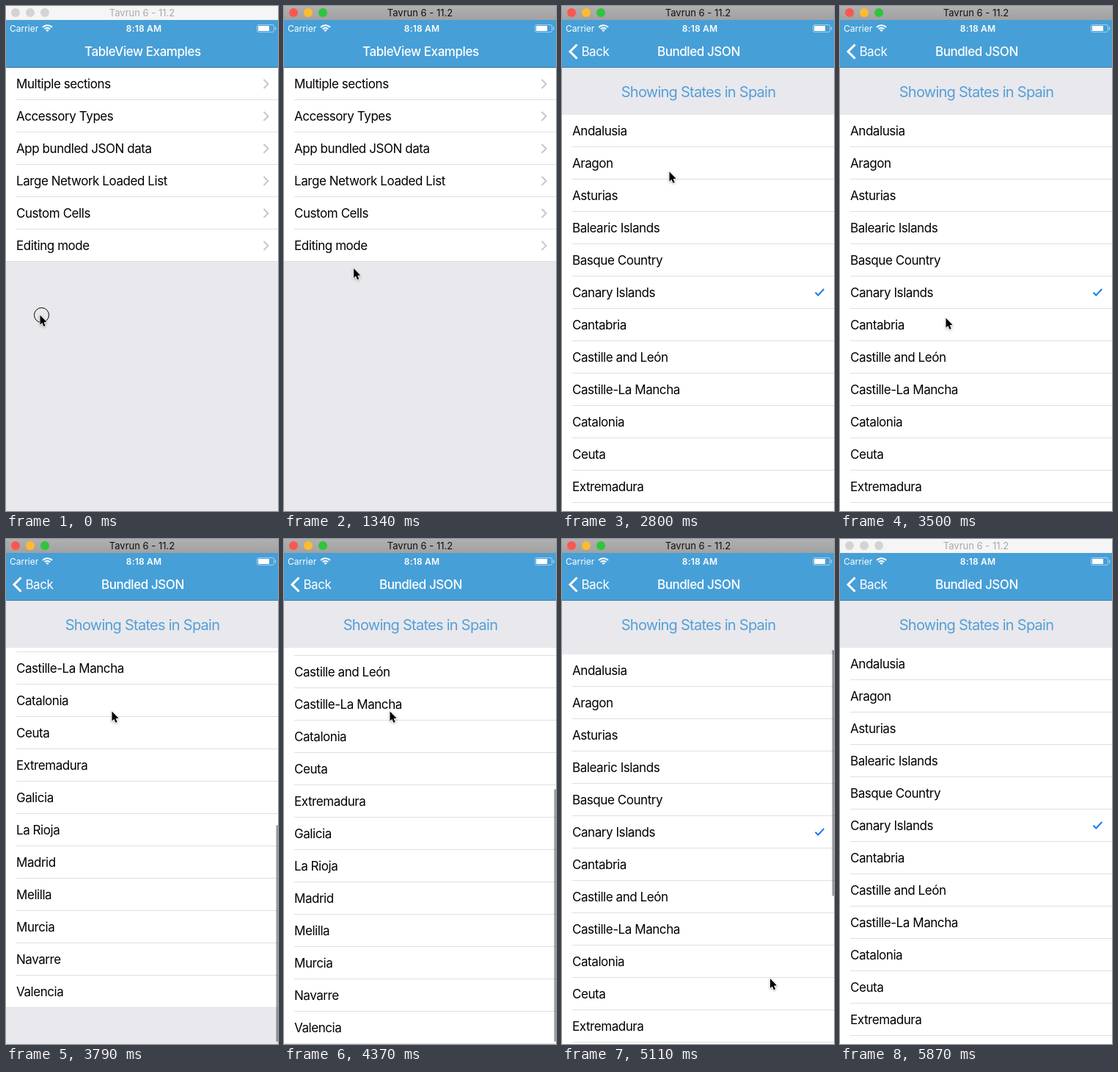
An HTML page with a canvas for the animation above (6.64 s loop, 371x687 px).

```html
<!DOCTYPE html>
<html lang="en">
<head>
<meta charset="utf-8">
<title>Table view demo</title>
<style>
  html, body { margin: 0; width: 100%; height: 100%; overflow: hidden; background: #e8e8ed; }
  canvas { display: block; width: 371px; height: 687px; }
</style>
</head>
<body>
<canvas id="stage" width="371" height="687"></canvas>
<script>
const ctx = document.getElementById('stage').getContext('2d');
const LOOP = 6640, W = 375, H = 687, ROW = 44, LIST_TOP = 148;
const BLUE = '#479fd7', BACKDROP = '#e8e8ed', LINE = '#dfdfe2';

const MENU = ['Multiple sections', 'Accessory Types', 'App bundled JSON data',
  'Large Network Loaded List', 'Custom Cells', 'Editing mode'];
const REGIONS = ['Andalusia', 'Aragon', 'Asturias', 'Balearic Islands', 'Basque Country',
  'Canary Islands', 'Cantabria', 'Castille and León', 'Castille-La Mancha', 'Catalonia',
  'Ceuta', 'Extremadura', 'Galicia', 'La Rioja', 'Madrid', 'Melilla', 'Murcia',
  'Navarre', 'Valencia'];
const CHECKED = 'Canary Islands';
const VIEW = H - LIST_TOP, CONTENT = REGIONS.length * ROW, MAX_SCROLL = CONTENT - VIEW;

const clamp = v => Math.min(1, Math.max(0, v));
const linear = u => u;
const smooth = u => u * u * (3 - 2 * u);
const easeOut = u => 1 - (1 - u) ** 2;

// Keys are [time, value, easing into this key].
function track(keys, t) {
  let prev = keys[0];
  for (const key of keys) {
    if (t < key[0]) {
      const u = clamp((t - prev[0]) / (key[0] - prev[0]));
      return prev[1] + (key[1] - prev[1]) * (key[2] || linear)(u);
    }
    prev = key;
  }
  return prev[1];
}

const CURSOR_X = [[0, 46], [360, 46], [530, 50, smooth], [1030, 50], [1700, 150, smooth],
  [1750, 150], [1870, 155, smooth], [2400, 155], [2800, 146, smooth], [3200, 136, smooth],
  [3500, 144, smooth], [4400, 144], [4640, 170, smooth], [4800, 182], [5110, 283, smooth], [5350, 384]];
const CURSOR_Y = [[0, 420], [360, 420], [530, 464, smooth], [1030, 464], [1700, 223, smooth],
  [1750, 223], [1870, 197, smooth], [2400, 197], [2800, 225, smooth], [3450, 424, smooth],
  [3530, 424], [3760, 234, smooth], [4400, 234], [4640, 420, smooth], [4800, 440], [5110, 597, smooth], [5350, 712]];
const SCROLL = [[3530, 0], [3640, 100, u => u * u], [3730, 300], [3790, 346, easeOut],
  [3830, 346], [4180, MAX_SCROLL, smooth], [4410, MAX_SCROLL], [4640, 120, smooth],
  [4750, 0], [4830, -35, easeOut], [4880, -35], [5110, -9, smooth], [5540, 0, easeOut]];

// Critically damped push of the second page.
function pushProgress(t) {
  const x = Math.max(0, t - 2162) * 0.014;
  return t >= 2800 ? 1 : 1 - (1 + x) * Math.exp(-x);
}

function rect(x, y, w, h, color) {
  ctx.fillStyle = color;
  ctx.fillRect(x, y, w, h);
}

function text(str, x, y, { size = 17, weight = 400, color = '#000', align = 'left', spacing = -0.44, alpha = 1 } = {}) {
  ctx.save();
  ctx.globalAlpha *= alpha;
  ctx.font = `${weight} ${size}px Inter, Roboto, sans-serif`;
  ctx.letterSpacing = spacing + 'px';
  ctx.textAlign = align;
  ctx.fillStyle = color;
  ctx.fillText(str, x, y);
  ctx.restore();
}

function stroke(points, color, width) {
  ctx.beginPath();
  points.forEach(p => ctx.lineTo(...p));
  ctx.strokeStyle = color;
  ctx.lineWidth = width;
  ctx.stroke();
}

function disc(x, y, r, color) {
  ctx.beginPath();
  ctx.arc(x, y, r, 0, 7);
  ctx.fillStyle = color;
  ctx.fill();
}

function rows(labels, top, accessory) {
  labels.forEach((label, i) => {
    const y = top + i * ROW;
    if (y > H || y < -ROW) return;
    const inset = i === labels.length - 1 ? 0 : 15;
    rect(0, y, W, ROW, '#fff');
    rect(inset, y + ROW - 1, W, 1, LINE);
    text(label, 15, y + 28);
    accessory(label, y + ROW / 2);
  });
}

function menuPage(p) {
  ctx.save();
  ctx.translate(-0.3 * W * p, 0);
  rect(0, 84, W * 1.4, H, BACKDROP);
  rows(MENU, 84, (label, y) =>
    stroke([[352.5, y - 6], [358.5, y], [352.5, y + 6]], '#c7c7cc', 2));
  ctx.restore();
  rect(0, 84, W, H, `rgba(0,0,0,${0.16 * p})`);
}

function regionPage(p, scroll, t) {
  ctx.save();
  ctx.translate(W * (1 - p), 0);
  if (p < 1) {
    const shade = ctx.createLinearGradient(-7, 0, 0, 0);
    shade.addColorStop(0, 'rgba(0,0,0,0)');
    shade.addColorStop(1, `rgba(0,0,0,${0.14 * (1 - p)})`);
    rect(-7, 84, 7, H, shade);
  }
  rect(0, 84, W, H, BACKDROP);
  text('Showing States in Spain', 187, 124,
    { size: 20, spacing: -0.74, color: '#559fd6', align: 'center' });
  ctx.beginPath();
  ctx.rect(0, LIST_TOP, W, VIEW);
  ctx.clip();
  rows(REGIONS, LIST_TOP - Math.round(scroll), (label, y) => {
    if (label === CHECKED) stroke([[346.5, y - 0.3], [350.3, y + 3.5], [358.3, y - 5]], '#1a7cf0', 2);
  });
  if (t >= 3560 && t < 5630) scrollBar(scroll);
  ctx.restore();
}

function scrollBar(scroll) {
  const span = VIEW - 6, full = span * VIEW / CONTENT;
  const over = Math.max(0, -scroll, scroll - MAX_SCROLL);
  const top = 151 + clamp(scroll / MAX_SCROLL) * (span - full) + (scroll > MAX_SCROLL ? over : 0);
  ctx.beginPath();
  ctx.roundRect(369.5, top, 2.5, full - over, 1.2);
  ctx.fillStyle = 'rgba(0,0,0,.4)';
  ctx.fill();
}

function statusBar() {
  const white = { size: 12, color: '#fff', spacing: 0 };
  text('Carrier', 6, 34.5, white);
  text('8:18 AM', 189, 34.5, { ...white, weight: 600, spacing: 0.2, align: 'center' });
  ctx.strokeStyle = '#fff';
  ctx.lineWidth = 2;
  for (const r of [5.2, 8.8]) {
    ctx.beginPath();
    ctx.arc(57.5, 35, r, -Math.PI * 0.76, -Math.PI * 0.24);
    ctx.stroke();
  }
  ctx.beginPath();
  ctx.moveTo(57.5, 35);
  ctx.arc(57.5, 35, 3, -Math.PI * 0.76, -Math.PI * 0.24);
  ctx.fillStyle = '#fff';
  ctx.fill();
  ctx.beginPath();
  ctx.roundRect(343.5, 25.5, 23, 10, 2.2);
  ctx.strokeStyle = 'rgba(255,255,255,.5)';
  ctx.lineWidth = 1;
  ctx.stroke();
  rect(345, 27, 15, 7, '#fff');
  rect(368, 28.5, 1.2, 4, 'rgba(255,255,255,.6)');
}

function navBar(p) {
  rect(0, 19, W, 65, BLUE);
  rect(0, 83, W, 1, `rgba(0,0,0,${0.3 - 0.12 * p})`);
  statusBar();
  const title = { weight: 500, color: '#fff', align: 'center', spacing: -0.43 };
  text('TableView Examples', 187.4 - 201 * p, 68, { ...title, alpha: clamp(1 - 1.1 * p) });
  text('Bundled JSON', 187.4 + 198 * (1 - p), 68, { ...title, alpha: clamp(p * 1.15) });
  ctx.save();
  ctx.globalAlpha = clamp(2 * p - 1);
  stroke([[21.5, 52.5], [12, 62], [21.5, 71.5]], '#fff', 3);
  text('Back', 27.4 + 90 * (1 - p), 68, { color: '#fff' });
  ctx.restore();
}

function windowBar(active) {
  let fill = '#f5f5f5';
  if (active) {
    fill = ctx.createLinearGradient(0, 0, 0, 19);
    fill.addColorStop(0, '#b0b0b0');
    fill.addColorStop(1, '#a1a1a1');
  }
  rect(0, 0, W, 19, fill);
  ['#fc5650', '#fdbc2f', '#2dc63c'].forEach((color, i) =>
    disc(13 + 20 * i, 9, 6, active ? color : '#d3d3d3'));
  text('Tavrun 6 - 11.2', 185.5, 14,
    { size: 13, spacing: 0, align: 'center', color: active ? '#111' : '#a9a9a9' });
}

function cursor(t) {
  const x = track(CURSOR_X, t), y = track(CURSOR_Y, t);
  const pressed = t < 60 || (t >= 720 && t < 820);
  if (pressed) {
    ctx.beginPath();
    ctx.arc(x + 2.5, y + 0.5, 10, 0, 7);
    ctx.strokeStyle = '#000';
    ctx.lineWidth = 1;
    ctx.stroke();
  }
  ctx.save();
  ctx.translate(x + 0.5, y + 0.5);
  ctx.scale(0.9, 0.9);
  ctx.beginPath();
  [[0, 0], [0, 14.5], [3.2, 11.6], [5.5, 17], [8, 16], [5.7, 10.8], [10, 10.4]]
    .forEach(p => ctx.lineTo(...p));
  ctx.closePath();
  ctx.shadowColor = 'rgba(0,0,0,.35)';
  ctx.shadowBlur = 3;
  ctx.shadowOffsetY = 1;
  ctx.strokeStyle = '#fff';
  ctx.lineWidth = 1.6;
  ctx.stroke();
  ctx.shadowColor = 'transparent';
  ctx.fillStyle = '#000';
  ctx.fill();
  ctx.restore();
}

function draw(t) {
  const p = pushProgress(t);
  ctx.save();
  ctx.translate(-1, 0);
  if (p < 1) menuPage(p);
  if (p > 0) regionPage(p, track(SCROLL, t), t);
  navBar(p);
  ctx.restore();
  windowBar(t >= 720 && t < 5870);
  if (t < 5350) cursor(t);
}

const start = performance.now();
function frame() {
  draw((performance.now() - start) % LOOP);
  requestAnimationFrame(frame);
}
frame();
</script>
</body>
</html>
```
